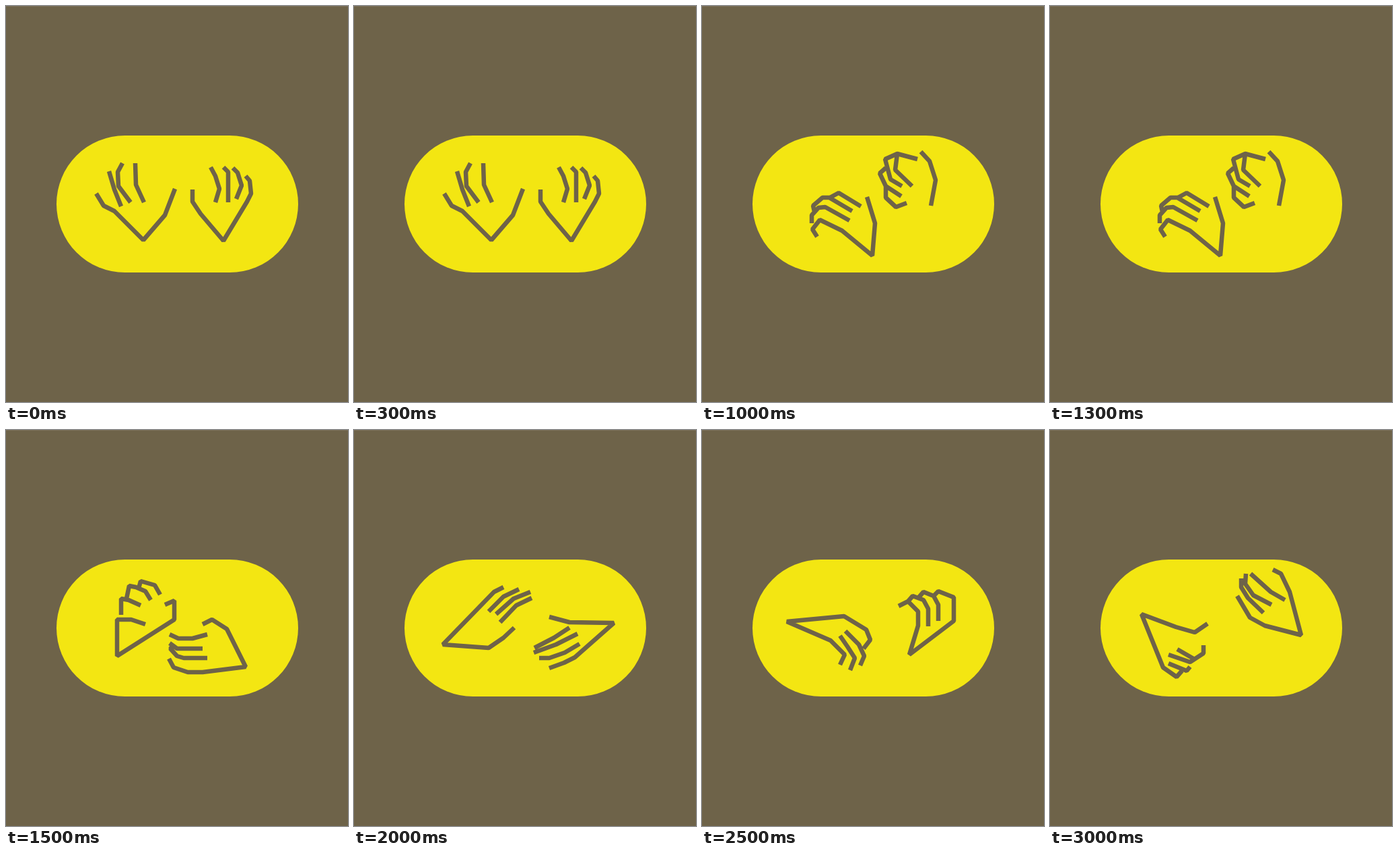
Animation of 508 by 587 pixels, one loop 3500 ms. Source, as an HTML page with a canvas:

```html
<!DOCTYPE html>
<html lang="en">
<head>
<meta charset="utf-8">
<title>Signing hands</title>
<style>
html, body { margin: 0; width: 100%; height: 100%; overflow: hidden; background: #6e6349; }
canvas { display: block; }
</style>
</head>
<body>
<canvas id="stage" width="508" height="587"></canvas>
<script>
const BROWN = '#6e6349';
const YELLOW = '#f3e612';
const HOLD = 500;

// Each pose lists the strokes of the left hand, then the right hand.
const raised = [
  'M134 278L145 296L161 304L204 347L236 310L251 271',
  'M153 245L161 272L171 297M173 233L166 246L167 267L185 291M192 233L193 265L205 291',
  'M277 272L277 290L289 308L323 348L358 290L364 278L362 259L356 252',
  'M304 239L311 252L317 271L311 291M323 239L330 246L330 291M337 240L344 247L350 266L342 286'
];
const hanging = [
  'M154 257L205 271L219 293L219 329',
  'M153 286L146 315L146 343M168 286L168 315L182 350M183 279L183 307L192 322L211 343',
  'M320 249L334 242L359 242L358 264L383 328L333 315L284 315',
  'M284 278L305 271L333 264L347 278M276 286L298 286L319 291L340 299'
];
const grasping = [
  'M245 283L257 322L253 370L208 333L175 317L164 331L171 342',
  'M236 297L203 277L190 284M223 304L189 284L179 284L165 296L167 305M219 318L183 298L173 299L163 310L163 322',
  'M325 216L338 230L347 258L340 296',
  'M320 227L290 219L272 227L280 257L297 267M290 219L287 243L312 267',
  'M273 240L264 248L273 267L296 282M273 266L273 284L288 298L304 292'
];
const cupped = [
  'M236 259L250 253L250 281L165 335L165 281L186 281L207 288',
  'M171 274L171 250L182 252L200 260M179 250L183 231L193 233L207 239L215 252M197 235L200 224L221 230L229 244',
  'M292 288L306 281L328 295L356 351L292 359L270 359L249 352L242 339',
  'M243 303L256 309L277 309L299 303M243 316L254 324L292 324M250 318L244 324L254 335L264 338L299 338'
];
const reaching = [
  'M222 233L208 240L132 318L200 323L222 308L238 293',
  'M200 269L222 247L245 236M211 273L237 250L262 240M217 285L241 260L264 249',
  'M290 277L320 285L386 286L328 337L312 345L290 353',
  'M320 293L297 308L268 323M332 302L300 318L267 330M335 317L313 330L290 338L275 338'
];
const dropping = [
  'M205 348L212 333L191 312L126 284L211 276L244 296L250 311L240 324',
  'M205 305L216 321L227 338L220 356M213 298L233 318L241 335L235 349',
  'M292 261L306 254L321 269L321 290L308 333L374 283L374 248L351 239L344 246',
  'M306 254L313 246L329 252L336 265L336 291M322 248L329 240L344 246L351 259L351 283'
];
const folding = [
  'M234 287L215 300L187 292L136 273L168 352L188 366L196 357',
  'M176 333L208 344L228 331L228 319M189 325L215 340M176 346L203 357L208 351',
  'M331 207L343 213L356 240L373 304L319 290L297 278L278 246',
  'M298 213L328 240L349 252M291 213L290 228L302 245L329 259M284 220L284 233L294 249L317 271'
];

const poses = [raised, hanging, grasping, cupped, reaching, dropping, folding]
  .map(strokes => new Path2D(strokes.join('')));
const ctx = document.getElementById('stage').getContext('2d');

function draw(now) {
  ctx.fillStyle = BROWN;
  ctx.fillRect(0, 0, 508, 587);
  ctx.fillStyle = '#7b715a';
  ctx.fillRect(0, 0, 508, 1);

  ctx.fillStyle = YELLOW;
  ctx.beginPath();
  ctx.roundRect(75, 192, 359, 203, 101.5);
  ctx.fill();

  ctx.strokeStyle = BROWN;
  ctx.lineWidth = 6.5;
  ctx.lineJoin = 'bevel';
  ctx.stroke(poses[Math.floor(now / HOLD) % poses.length]);
}

const start = performance.now();
function tick() {
  draw(performance.now() - start);
  requestAnimationFrame(tick);
}
tick();
</script>
</body>
</html>
```
